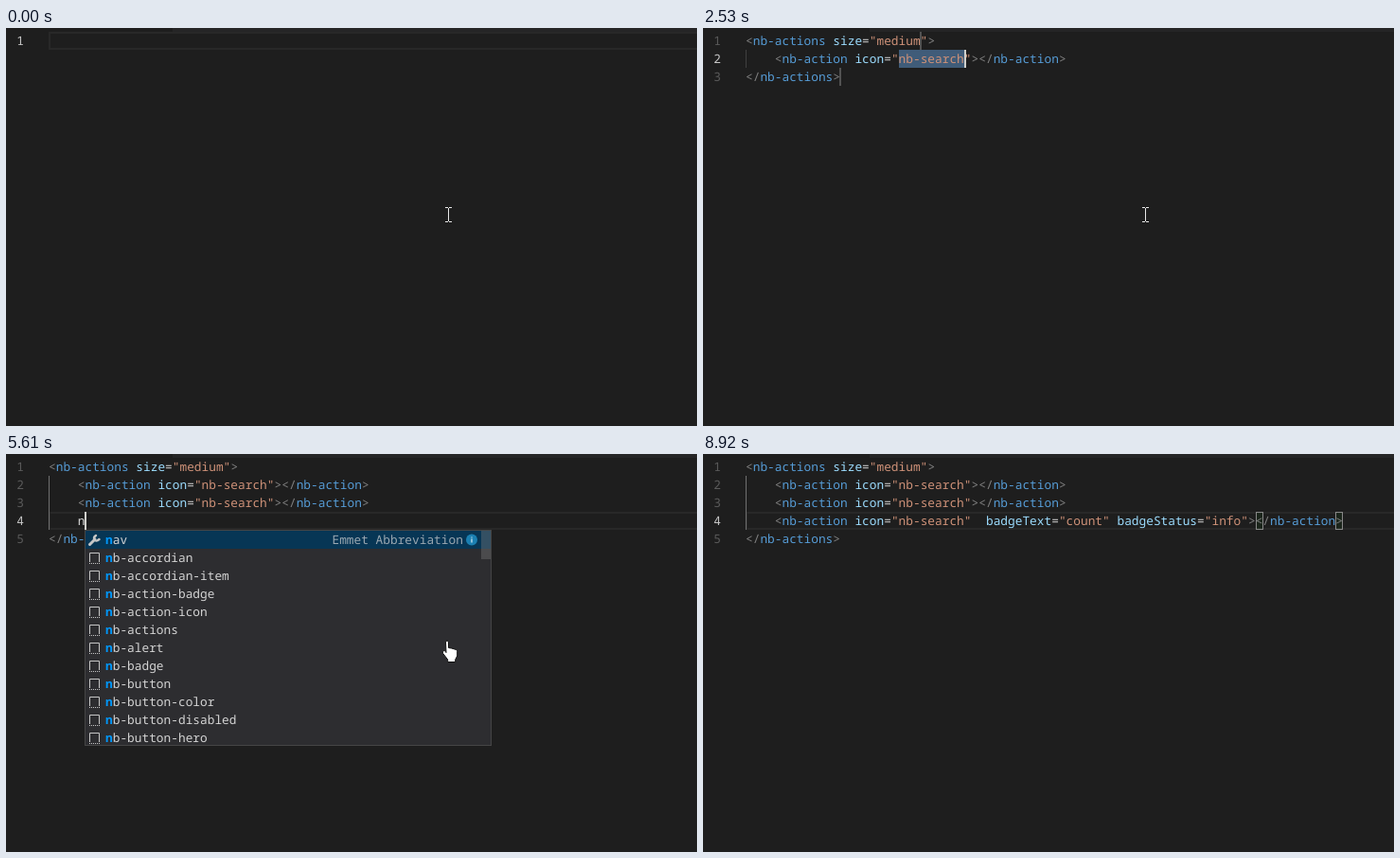
Recreate the animation shown at these times as an HTML page. Size 730 px wide and 420 px high, loop 8.95 s.

```html
<!DOCTYPE html>
<html lang="en">
<head>
<meta charset="utf-8">
<title>Snippet completion</title>
<style>
html, body { margin: 0; width: 100%; height: 100%; overflow: hidden; background: #1e1e1e; }
svg { display: block; width: 730px; height: 420px; }
text {
  font: 12.825px 'Noto Sans Mono', 'DejaVu Sans Mono', monospace;
  white-space: pre;
  text-rendering: geometricPrecision;
}
</style>
</head>
<body>
<svg viewBox="0 0 730 420">
  <rect width="730" height="420" fill="#1e1e1e"/>
  <rect x="176" width="554" height="4" fill="#252526"/>
  <g id="editor"></g>
  <g id="mouse">
    <path id="beam" fill="none" stroke="#e8e8e8"
      d="M464 189.5H467M468 189.5H471M467.5 190V204M464 204.5H467M468 204.5H471"/>
    <path id="hand" fill="#fff" stroke="#111" stroke-linejoin="round"
      d="M464.5 199q0-2 1.5-2t1.5 2v5.5l3 .5 2.5.7 2.5.8q1.2.7 1.2 2.2v4.3l-2 4v2.5h-8v-2.5l-5-6.5q-1.2-2 .3-2.7t2.5 1l.5.7z"/>
  </g>
</svg>
<script>
const LOOP = 8950, CW = 7.695, LH = 19, LEFT = 45, TOP = 4, POP_W = 430;
const $ = id => document.getElementById(id);
const colX = c => LEFT + c * CW;
const lineY = n => TOP + n * LH;

// Document text
const open = size => `<nb-actions size="${size}">`;
const action = '    <nb-action icon="nb-search"></nb-action>';
const badge = status =>
  `    <nb-action icon="nb-search"  badgeText="count" badgeStatus="${status}"></nb-action>`;
const close = '</nb-actions>';
const two = s => [open('medium'), action, s, close];
const three = s => [open('medium'), action, action, s, close];

// Completion lists
const nb = s => s.split(' ').map(w => 'nb-' + w);
const all = nb('accordian accordian-item action-badge action-icon actions alert badge ' +
  'button button-color button-disabled button-hero button-outline');
const lists = {
  n: ['nav', ...all.slice(0, 11)],
  nb: all,
  'nb-': all,
  'nb-a': [...all.slice(0, 7), ...nb('card layout tabs chat search')],
  size: ['small', 'medium', 'large'],
  status: ['primary', 'info', 'success', 'warning', 'danger']
};
const details = {
  'nb-accordian': 'NbAccordionComponent accordian (Nebular)',
  'nb-accordian-item': 'NbAccordionItemComponent item (Nebular)',
  'nb-action-badge': 'NbActionComponent action with badge (Nebular)',
  'nb-action-icon': 'NbActionComponent action with icon (Nebular)',
  'nb-actions': 'NbActionsComponent basic with one action (Nebular)'
};
const menu = (kind, line, col, thumb = 0, alpha = .4) =>
  ({ menu: { kind, line, col, thumb, alpha }, pick: 0 });

const at = (line, col) => ({ cur: [line, col], on: true });
const select = (line, a, b, holes = [], stops = []) =>
  ({ ...at(line, b), sel: [line, a, b], holes, stops });
const calm = { sel: null, holes: [], stops: [], menu: null };
const icon = [21, 30], count = [44, 49], status = [64, 71];
const on3 = (...spans) => spans.map(s => [3, ...s]);

// Each step adds its changes to the state before it
const steps = [
  [0, { ...calm, lines: [''], cur: [0, 0], on: false, pick: 0, match: false }],
  [100, { lines: ['n'], ...at(0, 1) }],
  [200, menu('n', 0, 1, 30)],
  [330, { lines: ['nb'], ...at(0, 2) }],
  [460, menu('nb', 0, 2, 30)],
  [860, { lines: ['nb-'], ...at(0, 3) }],
  [960, menu('nb-', 0, 3)],
  [1360, { lines: ['nb-a'], ...at(0, 4), ...menu('nb-a', 0, 4, 137, .12) }],
  [1470, { pick: 1 }], [1570, { pick: 2 }], [1670, { pick: 3 }], [1770, { pick: 4 }],
  [1900, { lines: [open('small'), action, close], menu: null,
    ...select(0, 18, 23, [[1, ...icon]], [[2, 13]]) }],
  [2030, menu('size', 0, 18)],
  [2270, { pick: 1 }],
  [2400, { lines: [open('medium'), action, close], ...calm, ...at(0, 24),
    holes: [[1, ...icon]], stops: [[0, 24], [2, 13]] }],
  [2500, select(1, ...icon, [], [[0, 24], [2, 13]])],
  [2720, { ...calm, ...at(1, 44) }],
  [3020, { lines: two('    '), ...at(2, 4) }],
  [3160, { lines: two('    n'), ...at(2, 5) }],
  [3260, menu('n', 2, 5, 30)],
  [3400, { lines: two('    nb'), ...at(2, 6) }],
  [3520, menu('nb', 2, 6, 30)],
  [3920, menu('nb', 2, 6)],
  [4120, { on: false }],
  [4550, { on: true, pick: 1 }], [4630, { pick: 2 }], [4710, { pick: 3 }], [4780, { pick: 4 }],
  [4900, { pick: 3 }],
  [5000, { lines: two(action), menu: null, ...select(2, ...icon, [], [[2, 44]]) }],
  [5220, { ...calm, ...at(2, 44) }],
  [5400, { lines: three('    '), ...at(3, 4) }],
  [5490, { lines: three('    n'), ...at(3, 5) }],
  [5580, menu('n', 3, 5, 30)],
  [5680, { lines: three('    nb'), ...at(3, 6) }],
  [5780, menu('nb', 3, 6, 30)],
  [6180, menu('nb', 3, 6)],
  [6280, { pick: 1 }],
  [6480, { pick: 2, on: false }],
  [6980, { lines: three(badge('primary')), menu: null,
    ...select(3, ...icon, on3(count, status), [[3, 85]]) }],
  [7250, select(3, ...count, on3(icon, status), [[3, 85]])],
  [7480, select(3, ...status, on3(icon, count), [[3, 85]])],
  [7560, menu('status', 3, 64)],
  [7700, { pick: 1 }],
  [7870, { lines: three(badge('info')), ...calm, ...at(3, 68),
    holes: on3(icon, count), stops: [[3, 68], [3, 82]] }],
  [7940, { ...calm, ...at(3, 82), match: true }],
  [8400, { on: false }],
  [8850, { on: true }],
  [8920, { on: false }]
];
let last = {};
const states = steps.map(([time, change]) => last = { ...last, ...change, time });

// Drawing helpers
const esc = s => s.replace(/&/g, '&amp;').replace(/</g, '&lt;');
const rect = (x, y, w, h, fill, more = '') =>
  `<rect x="${x}" y="${y}" width="${w}" height="${h}" fill="${fill}" ${more}/>`;
const text = (x, y, s, fill, more = '') =>
  `<text x="${x.toFixed(2)}" y="${y}" fill="${fill}" ${more}>${esc(s)}</text>`;
const span = ([line, a, b], fill) => {
  const x = Math.round(colX(a));
  return rect(x, lineY(line), Math.round(colX(b)) - x, LH, fill);
};

const inks = ['#808080', '#ce9178', '#d4d4d4', '#569cd6', '#9cdcfe'];
function codeLine(s, n) {
  const y = lineY(n) + 14;
  if (!s.includes('<')) return text(colX(s.search(/\S|$/)), y, s.trim(), '#d4d4d4');
  const token = /(<\/?|>)|("[^"]*")|(=)|(nb-\w+)|(\w+)/g;
  return [...s.matchAll(token)].map(m =>
    text(colX(m.index), y, m[0], inks[m.slice(1).findIndex(g => g)])).join('');
}

// Marks the typed letters in a label, in order
function label(s, typed, x, y) {
  let hit = 0;
  return [...s].map((ch, i) => {
    const found = ch === typed[hit];
    if (found) hit++;
    return text(x + i * CW, y, ch, found ? '#0097fb' : '#d4d4d4', found ? 'font-weight="bold" style="font-weight:bold"' : '');
  }).join('');
}

const snippetIcon = (x, y) =>
  `<g fill="none" stroke="#c5c5c5"><path d="M${x + .5} ${y + 10}V${y + .5}H${x + 10.5}V${y + 10}"/>` +
  `<path d="M${x} ${y + 11.5}H${x + 11}" stroke-dasharray="1 1"/></g>`;
const wrenchIcon = (x, y) =>
  `<g fill="none" stroke="#c5c5c5" stroke-linecap="round"><path stroke-width="3" d="M${x + 1.5} ${y + 10.5}L${x + 7} ${y + 5}"/>` +
  `<path stroke-width="2.4" d="M${x + 8} ${y + 1}q-3 2-1.5 4.500t5-.5"/></g>`;

function infoIcon(x, y) {
  return `<circle cx="${x}" cy="${y}" r="6" fill="#1b80b2"/>` +
    rect(x - .5, y - 3, 1, 1, '#fff') + rect(x - .5, y - 1, 1, 4, '#fff');
}

function drawMenu({ menu: m, pick }) {
  const x = Math.min(Math.round(colX(m.col)), 730 - POP_W);
  const y = lineY(m.line + 1), items = lists[m.kind], h = items.length * LH;
  const typed = m.kind.startsWith('n') ? m.kind : '';
  let out = rect(x, y, POP_W, h, '#2d2d30');
  items.forEach((item, i) => {
    const top = y + 1 + i * LH, base = top + 14;
    if (i === pick) out += rect(x + 1, top, POP_W - 2, LH, '#073655');
    out += item === 'nav' ? wrenchIcon(x + 4, top + 4) : snippetIcon(x + 5, top + 4);
    out += label(item, typed, x + 22, base);
    if (i !== pick) return;
    const ink = '#9aa7b1', end = x + 22 + item.length * CW + 11;
    if (item === 'nav') out += text(x + 400 - 18 * CW, base, 'Emmet Abbreviation', ink);
    const more = details[item];
    if (more) {
      const room = Math.floor((x + 403 - end) / CW);
      out += text(end, base, more.length > room ? more.slice(0, room - 1) + '…' : more, ink);
    }
    if (more || item === 'nav') out += infoIcon(x + 409, top + 9.5);
  });
  if (m.thumb) out += rect(x + POP_W - 11, y + 1, 10, m.thumb, '#797979', `opacity="${m.alpha}"`);
  return `<svg x="${x}" y="${y}" width="${POP_W}" height="${h}" style="width:${POP_W}px;height:${h}px" viewBox="${x} ${y} ${POP_W} ${h}">${out}` +
    rect(x + .5, y + .5, POP_W - 1, h - 1, 'none', 'stroke="#454545"') + '</svg>';
}

function drawEditor(s) {
  const [line, col] = s.cur, n = s.lines.length;
  let out = '';
  if (!s.sel) out += rect(LEFT + 1, lineY(line) + 1, 686, LH - 2, 'none', 'stroke="#282828" stroke-width="2"');
  if (n > 1) {
    const lit = !s.sel && line > 0 && line < n - 1;
    out += rect(LEFT, lineY(1), 1, (n - 2) * LH, lit ? '#707070' : '#404040');
  }
  s.holes.forEach(h => out += span(h, '#3a3a3a'));
  if (s.sel) out += span(s.sel, '#405c79');
  if (s.match) [70, 81].forEach(c => out += rect(Math.round(colX(c)) + .5, lineY(line) + .5, 7, LH - 1,
    'rgba(0,100,0,.1)', 'stroke="#888"'));
  s.stops.forEach(([l, c]) => out += rect(Math.round(colX(c)) - 1, lineY(l), 2, LH, '#525252'));
  s.lines.forEach((t, i) => {
    out += text(11.3, lineY(i) + 14, String(i + 1), i === line ? '#c6c6c6' : '#5a5a5a');
    out += codeLine(t, i);
  });
  if (s.on) out += rect(Math.round(colX(col)), lineY(line), 2, LH, '#d0d0cc');
  if (s.menu) out += drawMenu(s);
  return out;
}

let shown = null;
function draw(t) {
  const s = states.findLast(k => k.time <= t);
  if (s !== shown) {
    shown = s;
    $('editor').innerHTML = drawEditor(s);
    const over = s.menu && lists[s.menu.kind].length > 6;
    $('hand').style.display = over ? '' : 'none';
    $('beam').style.display = over ? 'none' : '';
  }
  const p = Math.min(1, Math.max(0, (t - 8150) / 650));
  $('mouse').setAttribute('transform', `translate(${12 * p} ${240 * p * p})`);
}

const start = performance.now();
function tick() {
  draw((performance.now() - start) % LOOP);
  requestAnimationFrame(tick);
}
tick();
</script>
</body>
</html>
```
